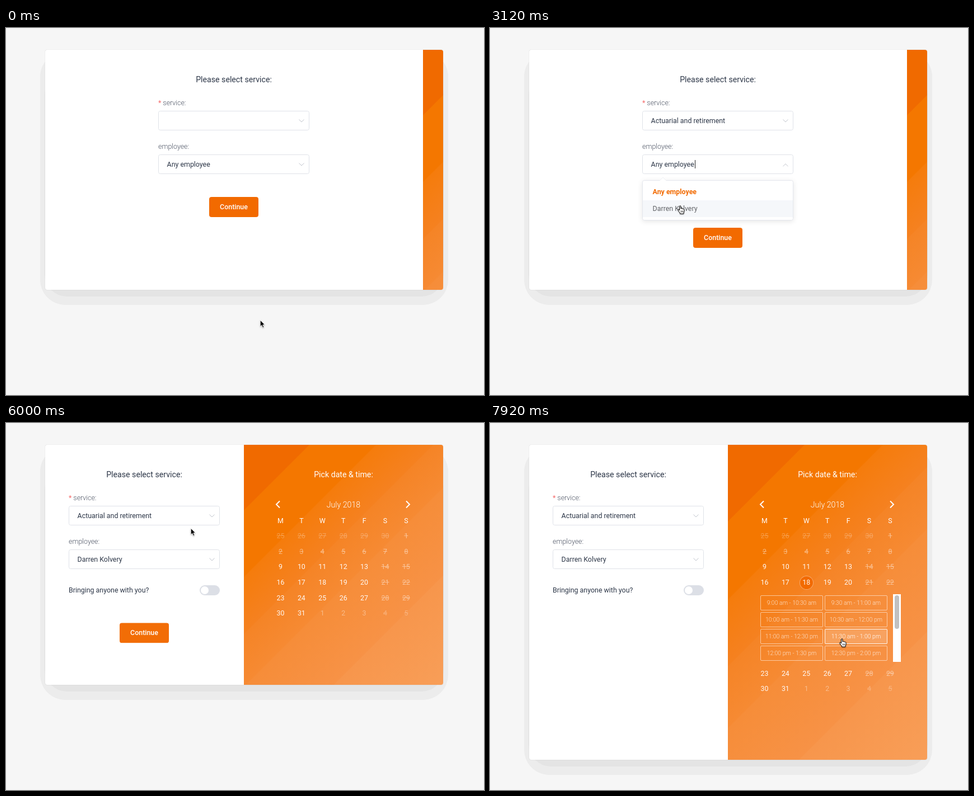
An HTML page that plays this animation: 854x656 px, repeating every 8 s.

```html
<!DOCTYPE html>
<html lang="en">
<head>
<meta charset="utf-8">
<title>Booking form</title>
<style>
/* One loop is 8 s, so 1% is 80 ms. */
:root { --ink: #2d3748; --grey: #606266; --line: #dfe2e8; --orange: #f26a00; }
html, body { margin: 0; width: 100%; height: 100%; overflow: hidden; background: #f6f6f6; }
body { position: relative; font: 12.4px/20px Roboto, sans-serif; color: var(--ink); }
body * { position: absolute; box-sizing: border-box; white-space: nowrap; }
.anim { animation: 8s infinite both; }
.step { animation: 8s step-end infinite both; }
svg { overflow: visible; fill: none; }

#box { left: 70px; top: 39px; width: 711px; height: 428.5px; animation-name: grow; }
.shade1 { inset: 3px -9px -27px; border-radius: 45px; background: #ececec; }
.shade2 { inset: 40px -1px -12px; border-radius: 40px; background: #e4e4e4; }
#card { inset: 0; overflow: hidden; border-radius: 4px; background: #fff; }
.edge { inset: 0; border-radius: 4px; box-shadow: 0 0 1px rgba(0,0,0,.3); }
@keyframes grow {
  0%, 86.8% { height: 428.5px; }
  90.5%, 100% { height: 563px; }
}

#form { left: 202px; top: 0; width: 270px; height: 428px; animation-name: formSlide; }
@keyframes formSlide {
  0%, 68.28% { transform: none; }
  74.53%, 100% { transform: translateX(-160px); }
}
.title { top: 43px; width: 100%; text-align: center; font-size: 14.18px; }
.label { left: 0; font-weight: 300; color: #4f5666; }
.label b { position: static; font-weight: 400; color: #f56c6c; }
.select { left: 0; width: 270px; height: 35.4px; border: 1px solid var(--line); border-radius: 3.5px; }
.select span { left: 14.6px; top: 7px; }
.select svg { left: 249.5px; top: 13.5px; width: 10px; height: 6px; transform-origin: 50% 3.4px; }
.select path { stroke: #c0c4cc; }
.caret { left: 92.5px; top: 9px; width: 1px; height: 15px; background: #222; animation-name: caret; }
@keyframes flip1 { 0%, 12% { rotate: 0deg; } 15.75%, 23.75% { rotate: 180deg; } 27.5%, 100% { rotate: 0deg; } }
@keyframes flip2 { 0%, 32% { rotate: 0deg; } 35.75%, 42.5% { rotate: 180deg; } 46.25%, 100% { rotate: 0deg; } }
@keyframes caret { 0% { opacity: 0; } 32.5% { opacity: 1; } 42.5%, 100% { opacity: 0; } }
@keyframes on24 { 0% { opacity: 0; } 24%, 100% { opacity: 1; } }
@keyframes on43 { 0% { opacity: 0; } 42.5%, 100% { opacity: 1; } }
@keyframes off43 { 0% { opacity: 1; } 42.5%, 100% { opacity: 0; } }

#guest { left: 0; top: 250px; width: 270px; height: 20px; animation-name: guest; }
.switch { right: 0; top: 1.2px; width: 35.6px; height: 17.8px; border-radius: 9px; background: #dcdfe6; }
.switch i { left: 1.5px; top: 1.6px; width: 14.4px; height: 14.4px; border-radius: 50%; background: #fff; }
@keyframes guest { 0%, 24.5% { opacity: 0; } 28.5%, 100% { opacity: 1; } }

#go { left: 91px; top: 263px; width: 88px; height: 36px; animation-name: drop; }
#go div { inset: 0; border: 1px solid var(--orange); border-radius: 3.5px; background: var(--orange);
  font-weight: 500; line-height: 34px; text-align: center; color: #fff; animation-name: hoverGo; }
@keyframes drop {
  0%, 24.5% { transform: none; opacity: 1; }
  28.5%, 74.5% { transform: translateY(55px); opacity: 1; animation-timing-function: ease-in; }
  79%, 100% { transform: translateY(68px); opacity: 0; }
}
@keyframes hoverGo {
  0% { background: var(--orange); }
  47% { background: #f78526; }
  69.6%, 100% { background: var(--orange); }
}

.pop { left: 0; width: 270px; border: 1px solid #e4e7ed; border-radius: 3.5px; background: #fff;
  box-shadow: 0 2px 10px rgba(0,0,0,.1); transform-origin: 50% 0;
  animation-timing-function: cubic-bezier(.23,1,.32,1); }
.pop svg { left: 30px; top: -6px; width: 12px; height: 7px; }
.list { inset: 5px 0 0; overflow: hidden; }
.item { width: 100%; height: 30.1px; padding-left: 17.6px; line-height: 30.1px; color: var(--grey); }
.item.on { font-weight: 700; color: var(--orange); }
.hover { width: 100%; height: 30.1px; background: #f5f7fa; }
.thumb { right: 2px; top: 2px; width: 5.5px; height: 43px; border-radius: 3px; background: #d8dade; }
@keyframes pop1 {
  0%, 12% { opacity: 0; transform: scaleY(0); }
  15.75%, 23.75% { opacity: 1; transform: none; }
  27.5%, 100% { opacity: 0; transform: scaleY(0); }
}
@keyframes pop2 {
  0%, 32% { opacity: 0; transform: scaleY(0); }
  35.75%, 42.5% { opacity: 1; transform: none; }
  46.25%, 100% { opacity: 0; transform: scaleY(0); }
}
@keyframes hover2 { 0% { top: 0; } 37.6%, 100% { top: 30.1px; } }

#panel { left: 355px; top: 0; bottom: 0; width: 356px; color: #fff; animation-name: panelSlide;
  background: linear-gradient(135deg, #f06a00 14.8%, #f47700 15% 30%, #f57c0c 30.2%, #f58120 43%,
    #f58426 43.2%, #f68a33 55%, #f68d39 55.2%, #f79246 75%, #f7964c 75.2%, #f89e58); }
@keyframes panelSlide {
  0%, 68.28% { transform: translateX(320px); }
  74.53%, 100% { transform: none; }
}
.nav { top: 99.5px; width: 7px; height: 13px; }
.nav path { stroke: #fff; stroke-width: 2; }
.month { left: 0; top: 97px; width: 356px; text-align: center; font-size: 14.18px; font-weight: 300; }
.cell { width: 37.4px; text-align: center; }
.off { text-decoration: line-through; }
.fade { animation: fade 8s infinite both; }
@keyframes fade { 0%, 69% { opacity: var(--from); } 73.5%, 100% { opacity: var(--to); } }
#late { left: 0; top: 0; animation-name: late; }
@keyframes late { 0%, 86.8% { transform: none; } 90.5%, 100% { transform: translateY(134.6px); } }
.ring { left: 128px; top: 234px; width: 25px; height: 25px; border-radius: 50%;
  border: 1px solid rgba(255,255,255,.42); animation-name: ring; }
@keyframes ring {
  0% { opacity: 0; background: transparent; }
  84.5% { opacity: 1; background: transparent; }
  86.75%, 100% { opacity: 1; background: var(--orange); }
}

#slots { left: 58px; top: 267px; width: 251px; height: 121px; overflow: hidden; animation-name: slots; }
@keyframes slots {
  0%, 86.8% { height: 0; opacity: 0; }
  90.5%, 100% { height: 121px; opacity: 1; }
}
.slot { width: 112px; height: 26.5px; border: 1px solid rgba(255,255,255,.55); border-radius: 2px;
  font-size: 10.5px; font-weight: 300; line-height: 25px; text-align: center; color: rgba(255,255,255,.75); }
.slot.hot { animation-name: hot; }
@keyframes hot {
  0% { background: transparent; border-color: rgba(255,255,255,.55); color: rgba(255,255,255,.75); }
  96%, 100% { background: rgba(255,255,255,.17); border-color: rgba(255,255,255,.9); color: #fff; }
}
.bar { left: 237px; top: 0; width: 13.5px; height: 121px; background: #fff; }
.bar i { left: 3px; top: 2px; width: 8px; height: 60px; border-radius: 4px; background: #c1c1c1; }

#cursor { left: 0; top: 0; animation-name: path; filter: drop-shadow(0 1px 1px rgba(0,0,0,.3)); }
@keyframes path {
  0%, .5% { transform: translate(454px,522px); }
  6% { transform: translate(364px,125px); }
  7%, 8.5% { transform: translate(364px,132px); }
  12% { transform: translate(346px,166px); }
  17% { transform: translate(333px,220px); }
  19%, 24% { transform: translate(334px,221px); }
  31%, 33% { transform: translate(336px,243px); }
  38.5%, 42.7% { transform: translate(335px,317px); }
  48% { transform: translate(404px,384px); }
  50%, 68.3% { transform: translate(399px,373px); }
  69% { transform: translate(401px,373px); }
  75% { transform: translate(330px,188px); animation-timing-function: ease-in; }
  80% { transform: translate(410px,214px); animation-timing-function: ease-out; }
  86%, 87% { transform: translate(550px,284px); }
  91% { transform: translate(566px,306px); }
  97%, 100% { transform: translate(624px,385px); }
}
#arrow { animation-name: arrow; }
#hand { animation-name: hand; }
@keyframes arrow { 0% { opacity: 1; } 9% { opacity: 0; } 68.5% { opacity: 1; } 91%, 100% { opacity: 0; } }
@keyframes hand { 0% { opacity: 0; } 9% { opacity: 1; } 68.5% { opacity: 0; } 91%, 100% { opacity: 1; } }
</style>
</head>
<body>
<div id="box" class="anim">
  <div class="shade1"></div>
  <div class="shade2"></div>
  <div class="edge"></div>
  <div id="card">
    <div id="form" class="anim">
      <div class="title">Please select service:</div>
      <div class="label" style="top:85px"><b>*</b> service:</div>
      <div class="select" style="top:109px">
        <span class="step" style="animation-name:on24">Actuarial and retirement</span>
        <svg class="anim" style="animation-name:flip1"><path d="M.5 .5 5 5 9.5 .5"/></svg>
      </div>
      <div class="label" style="top:163px">employee:</div>
      <div class="select" style="top:187px">
        <span class="step" style="animation-name:off43">Any employee</span>
        <span class="step" style="animation-name:on43">Darren Kolvery</span>
        <i class="caret step"></i>
        <svg class="anim" style="animation-name:flip2"><path d="M.5 .5 5 5 9.5 .5"/></svg>
      </div>
      <div id="guest" class="anim">Bringing anyone with you?<div class="switch"><i></i></div></div>
      <div id="go" class="anim"><div class="step">Continue</div></div>
      <div class="pop anim" style="top:155px;height:231px;animation-name:pop1">
        <svg><path d="M0 6 6 0 12 6" fill="#fff" stroke="#eef0f4"/></svg>
        <div class="list" id="services"><div class="hover"></div></div>
        <i class="thumb"></i>
      </div>
      <div class="pop anim" style="top:233px;height:72px;animation-name:pop2">
        <svg><path d="M0 6 6 0 12 6" fill="#fff" stroke="#eef0f4"/></svg>
        <div class="list" id="staff"><div class="hover step" style="animation-name:hover2"></div></div>
      </div>
    </div>
    <div id="panel" class="anim">
      <div class="title">Pick date &amp; time:</div>
      <svg class="nav" style="left:57px"><path d="M7 .5 1 6.5 7 12.5"/></svg>
      <svg class="nav" style="left:290px"><path d="M0 .5 6 6.5 0 12.5"/></svg>
      <div class="month">July 2018</div>
      <div class="ring step"></div>
      <div id="days"></div>
      <div id="late" class="anim"></div>
      <div id="slots" class="anim"><div class="bar"><i></i></div></div>
    </div>
  </div>
</div>
<div id="cursor" class="anim">
  <svg id="arrow" class="step" width="9" height="15">
    <path d="M.3 .3V11.6L2.9 9.2 4.8 13.6 6.7 12.8 4.9 8.5H8.3Z" fill="#000" stroke="#fff" stroke-width=".8"/>
  </svg>
  <svg id="hand" class="step" width="13" height="16">
    <path d="M3.6 9V2c0-1.8 2.3-1.8 2.3 0V6c.3-.9 2-.9 2.2.3.4-.8 1.9-.6 2 .5.6-.6 1.9-.3 1.9.9v2.6c0 1-.9 2.2-1 3.2v1.6H4.6v-1.3C3.6 12.6 2.1 10.6 1 9c-1-1.6.6-2.4 1.5-1.3Z" fill="#fff" stroke="#000"/>
    <path d="M6.2 9.5v3M8 9.5v3M9.7 9.5v3" stroke="#000" stroke-width=".7"/>
  </svg>
</div>
<script>
const byId = id => document.getElementById(id);

function add(parent, cls, text, x, y) {
  const el = document.createElement('div');
  el.className = cls;
  el.textContent = text;
  el.style.left = x + 'px';
  el.style.top = y + 'px';
  parent.append(el);
  return el;
}

const services = ['Actuarial and retirement', 'Audit and assurance', 'Big data analysis',
  'Brand Strategy and Analytics', 'Compensation', 'Digital and operating model challenges',
  'Employee benefits', 'Employee engagement'];
services.forEach((s, i) => add(byId('services'), 'item', s, 0, i * 30.1));
['Any employee', 'Darren Kolvery'].forEach((s, i) =>
  add(byId('staff'), i ? 'item' : 'item on', s, 0, i * 30.1));

const colX = col => 46.8 + col * 37.4;
[...'MTWTFSS'].forEach((d, i) => add(byId('days'), 'cell', d, colX(i), 125.5));

for (let i = 0; i < 42; i++) {
  const row = Math.floor(i / 7), col = i % 7;
  const day = i < 6 ? 25 + i : i < 37 ? i - 5 : i - 36;
  const outside = i < 6 || i > 36, off = row < 2 || col > 4;
  const el = add(byId(row < 4 ? 'days' : 'late'), 'cell fade' + (off ? ' off' : ''),
    day, colX(col), 153 + row * 27.65);
  el.style.setProperty('--from', outside ? .45 : .92);
  el.style.setProperty('--to', outside ? (off ? .28 : .4) : off ? .48 : .95);
}

function clock(min) {
  const h = Math.floor(min / 60);
  return `${(h + 11) % 12 + 1}:${String(min % 60).padStart(2, '0')} ${h < 12 ? 'am' : 'pm'}`;
}
for (let i = 0; i < 8; i++) {
  const start = 540 + i * 30;
  add(byId('slots'), i === 5 ? 'slot step hot' : 'slot', `${clock(start)} - ${clock(start + 90)}`,
    i % 2 * 115, 2 + Math.floor(i / 2) * 30.1);
}
</script>
</body>
</html>
```
